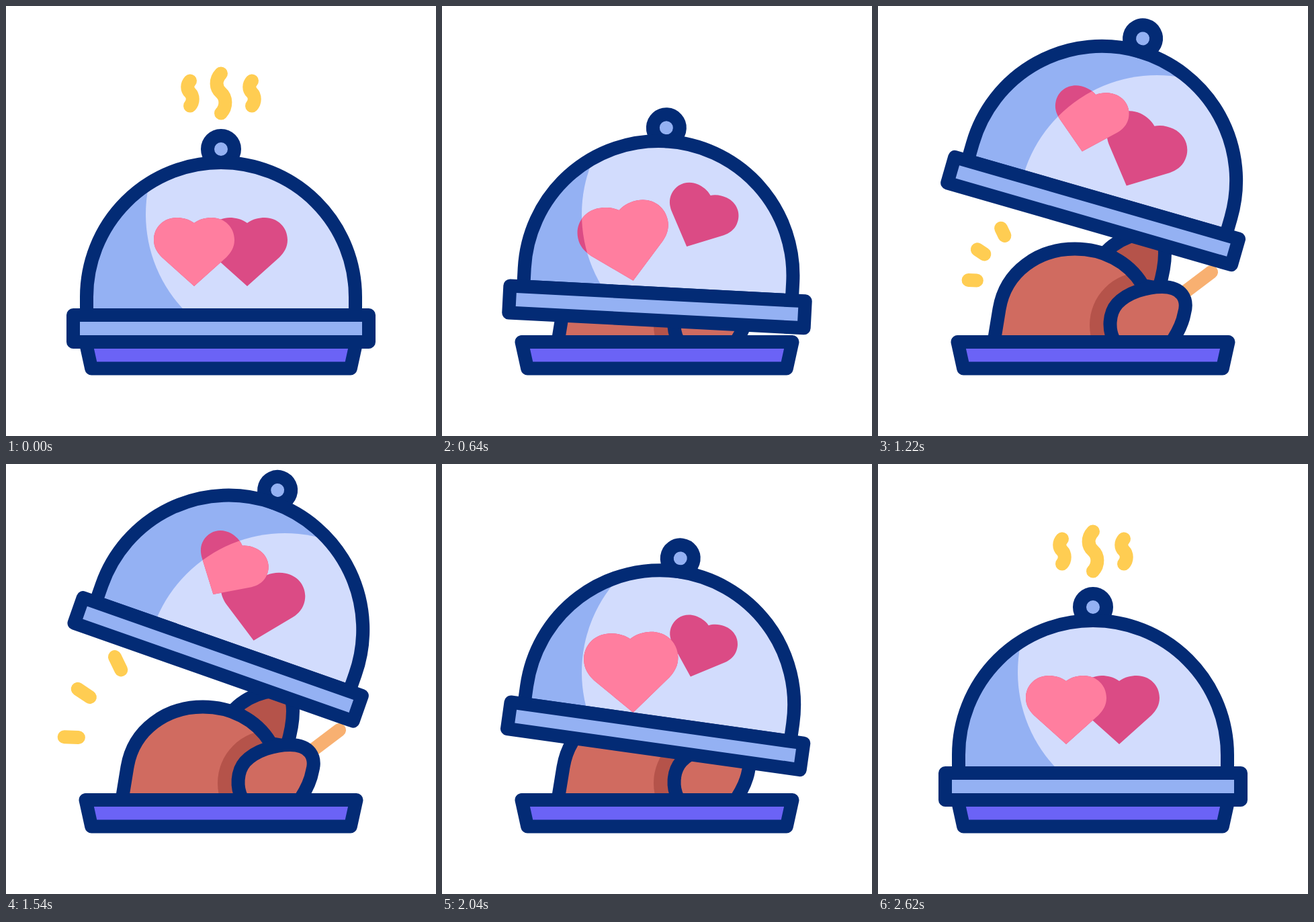
These frames come from a looping animation (640x640 px, 3000 ms). An HTML page:

```html
<!DOCTYPE html>
<html lang="en">
<head>
<meta charset="utf-8">
<title>Served with love</title>
<style>
  html, body { margin: 0; width: 100%; height: 100%; overflow: hidden; background: #fff; }
  svg { display: block; width: 100vw; height: 100vh; }
  .line { stroke: #032b75; stroke-width: 20; stroke-linejoin: round; }
  .glow { fill: none; stroke: #ffcd52; stroke-width: 20; stroke-linecap: round; stroke-linejoin: round; }
  .none { fill: none; }
  .sky { fill: #94b1f3; }
  .meat { fill: #d06b60; }
  .dark { fill: #b5534a; }
  .rose { fill: #db4b85; }
  .pink { fill: #ff7e9f; }
</style>
</head>
<body>
<svg viewBox="0 0 640 640">
  <defs>
    <path id="bell" d="M-200 27V0A200 200 0 0 1 200 0V27Z"/>
    <path id="heart" d="M0-25C-8-31-18-33-26-33C-45-33-60-19-60 0C-60 11-55 19-48 26L0 69L48 26C55 19 60 11 60 0C60-19 45-33 26-33C18-33 8-31 0-25Z"/>
    <path id="body" d="M173 497L180.5 451C190 394 240 361.5 293 361.5C335 361.5 372 380 393 414L400 497Z"/>
    <path id="wisp" class="glow" pathLength="1" d="M0 18.5C5 13 5 4 0-1S-5-13 0-18.5"/>
    <clipPath id="inBell"><use href="#bell" class="lid"/></clipPath>
    <clipPath id="inLight"><circle cx="415" cy="310" r="207"/></clipPath>
    <clipPath id="inBody"><use href="#body"/></clipPath>
  </defs>

  <path d="M496 396L455 427" fill="none" stroke="#f8b071" stroke-width="20" stroke-linecap="round"/>
  <path class="line dark" d="M340 365C352 353 365 345 385 340C420 332 427 346 427 368C427 385 424 400 418 420L395 416Z"/>
  <use href="#body" class="meat"/>
  <circle class="dark" cx="394" cy="475" r="79" clip-path="url(#inBody)"/>
  <path class="line none" d="M173 497L180.5 451C190 394 240 361.5 293 361.5C335 361.5 372 380 393 414"/>
  <path class="line meat" d="M351 497C343 482 343 458 356 443C372 426 400 418 423 418C452 418 462 436 456 457C453 474 446 486 439 497"/>
  <path class="line" fill="#6b63f6" d="M118.5 500H521.5L512.8 539.5H127.2Z"/>

  <g id="rays">
    <path class="glow" pathLength="1" d="M147 408.5L80 406"/>
    <path class="glow" pathLength="1" d="M158.5 369.5L101 331"/>
    <path class="glow" pathLength="1" d="M188.5 342L159 281"/>
  </g>

  <use href="#bell" class="lid sky"/>
  <g clip-path="url(#inBell)"><circle cx="415" cy="310" r="207" fill="#d2dcfd"/></g>
  <use href="#heart" class="rose two"/>
  <use href="#heart" class="rose one"/>
  <g clip-path="url(#inLight)"><use href="#heart" class="pink one"/></g>
  <g class="lid">
    <circle class="line sky" cy="-220" r="20"/>
    <use href="#bell" class="line none"/>
    <path class="line sky" d="M-220 27H220V67H-220Z"/>
  </g>

  <g id="steam">
    <path class="glow" pathLength="1" d="M274 148.5C279 143 279 134 274 129S269 117 274 111.5"/>
    <path class="glow" pathLength="1" d="M320 159.5C329 150 328 136 320 129S311 110 320 100.5"/>
    <path class="glow" pathLength="1" d="M366 148.5C371 143 371 134 366 129S361 117 366 111.5"/>
  </g>
</svg>
<script>
const LOOP = 3000, STEP = 20, BEGIN = 200, END = 2620;
const all = q => [...document.querySelectorAll(q)];
const lids = all('.lid'), ones = all('.one'), twos = all('.two');
const rays = all('#rays path'), steam = all('#steam path');

const smooth = (t, a, b) => {
  const u = Math.min(1, Math.max(0, (t - a) / (b - a)));
  return u * u * (3 - 2 * u);
};

// Eases from rest through three peaks and back to rest
const swing = (t, times, [a, b, c]) => {
  const [p, q, r] = times;
  return a * smooth(t, BEGIN, p) + (b - a) * smooth(t, p, q)
    + (c - b) * smooth(t, q, r) - c * smooth(t, r, END);
};

const place = (els, m) => els.forEach(e => e.setAttribute('transform', m));
const move = (x, y, r, s = 1) => `translate(${x} ${y}) rotate(${r}) scale(${s})`;

// The lid rises, tips a little further, then drops back
function lidAt(t) {
  const drop = smooth(t, 1700, 2295);
  const rise = smooth(t, 400, 1280) - drop;
  const tip = smooth(t, 1280, 1660) - drop;
  return move(320 + 13.3 * rise - 2.7 * tip, 433 - 175.5 * rise - 14.4 * tip, 16.3 * rise + 4 * tip);
}

// Hearts circle each other: sway turns and shifts one, depth lowers and enlarges it
const SWAY = [860, 1540, 2040];
const BEAT = (END - BEGIN) / 4;
const DEPTH = [1, 2, 3].map(n => BEGIN + n * BEAT);

function heartAt(t, { x, lean, slide, near, grow, bend }) {
  const turn = swing(t, SWAY, lean);
  const d = swing(t, DEPTH, [1, -1, 1]);
  return move(x + slide * turn, -85 + near * d, turn, 1 + grow * d + bend * d * d);
}
const one = { x: -40, lean: [-19.4, 11.6, -10.3], slide: 1.17, near: 23, grow: .15, bend: .02 };
const two = { x: 39, lean: [29.7, -8.2, 11.4], slide: 1.07, near: -21, grow: -.1, bend: -.04 };

function trim(els, from, to) {
  const size = to - from;
  for (const { style } of els) {
    style.visibility = size > .002 ? 'visible' : 'hidden';
    style.strokeDasharray = `${Math.max(0, size)} 2`;
    style.strokeDashoffset = -from;
  }
}

function draw(now) {
  const t = Math.floor(now % LOOP / STEP) * STEP;
  const lid = lidAt(t);
  place(lids, lid);
  place(ones, lid + heartAt(t, one));
  place(twos, lid + heartAt(t, two));
  trim(rays, smooth(t, 1204, 1808), smooth(t, 1054, 1658));
  trim(steam, t < 1400 ? smooth(t, BEGIN, 596) : 0, t < 1400 ? 1 : smooth(t, 2220, END));
}

const start = performance.now();
function tick() {
  draw(performance.now() - start);
  requestAnimationFrame(tick);
}
tick();
</script>
</body>
</html>
```
